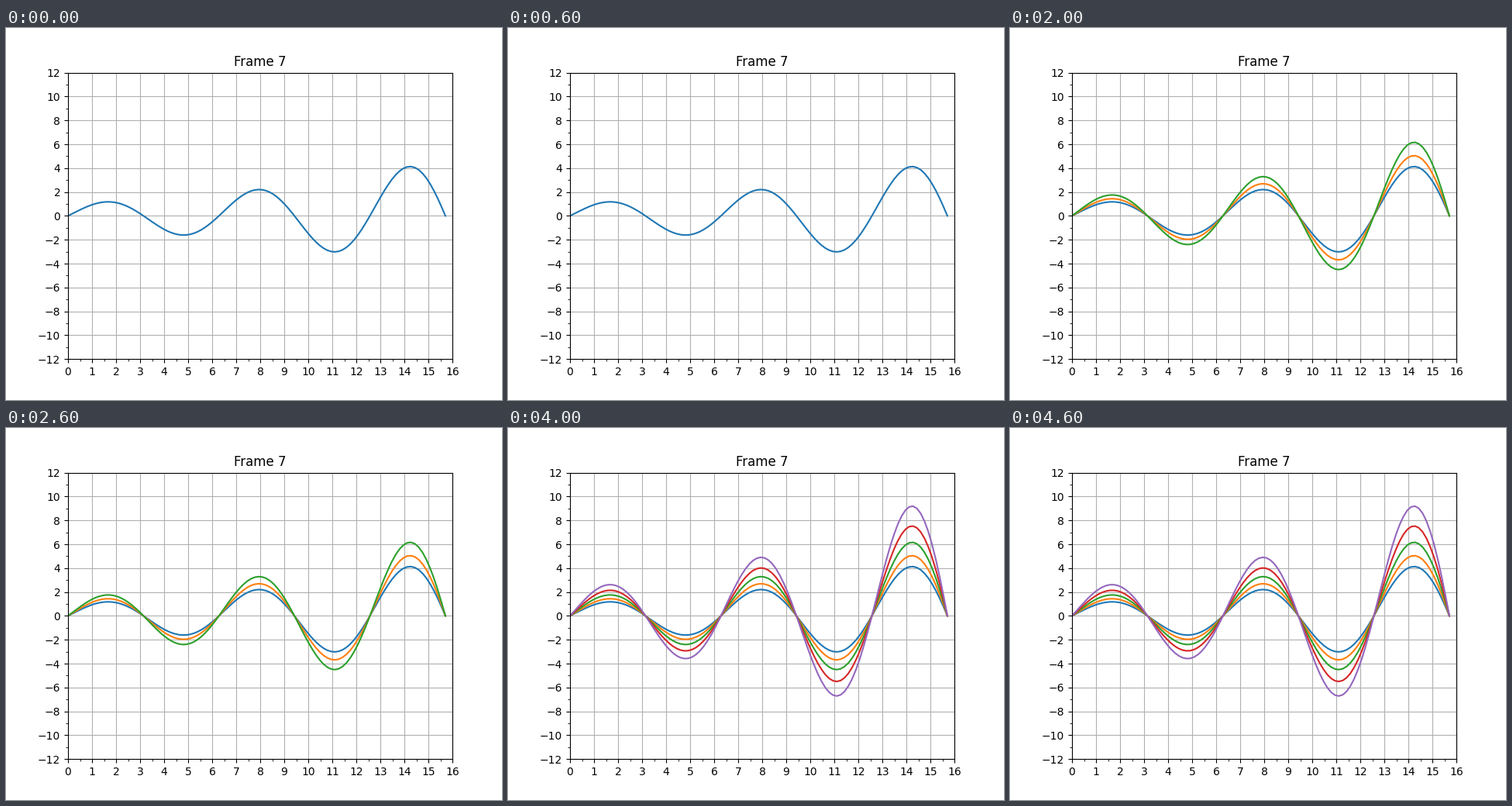
Animation of 640x480 px, one loop 5 s. Source, as a matplotlib script:

```python
import matplotlib.pyplot as plt
import numpy as np
from matplotlib.animation import FuncAnimation
from matplotlib.ticker import MultipleLocator

CURVES = 5

fig, ax = plt.subplots(figsize=(6.4, 4.8), dpi=100)
ax.set(xlim=(0, 16), ylim=(-12, 12), title="Frame 7")
for axis, step in ((ax.xaxis, 1), (ax.yaxis, 2)):
    axis.set_major_locator(MultipleLocator(step))
    axis.set_minor_locator(MultipleLocator(step / 2))

# Growing sine waves, each e^0.2 times taller than the one before
x = np.linspace(0, 5 * np.pi, 100)
lines = [ax.plot(x, np.sin(x) * np.exp(0.1 * x + 0.2 * k))[0]
         for k in range(CURVES)]


def update(step):
    for k, line in enumerate(lines):
        line.set_visible(k <= step)
    ax.grid(step % 2 == 0)
    return lines


anim = FuncAnimation(fig, update, frames=CURVES, interval=1000,
                     repeat=True, repeat_delay=0, blit=False)
plt.show()
```
